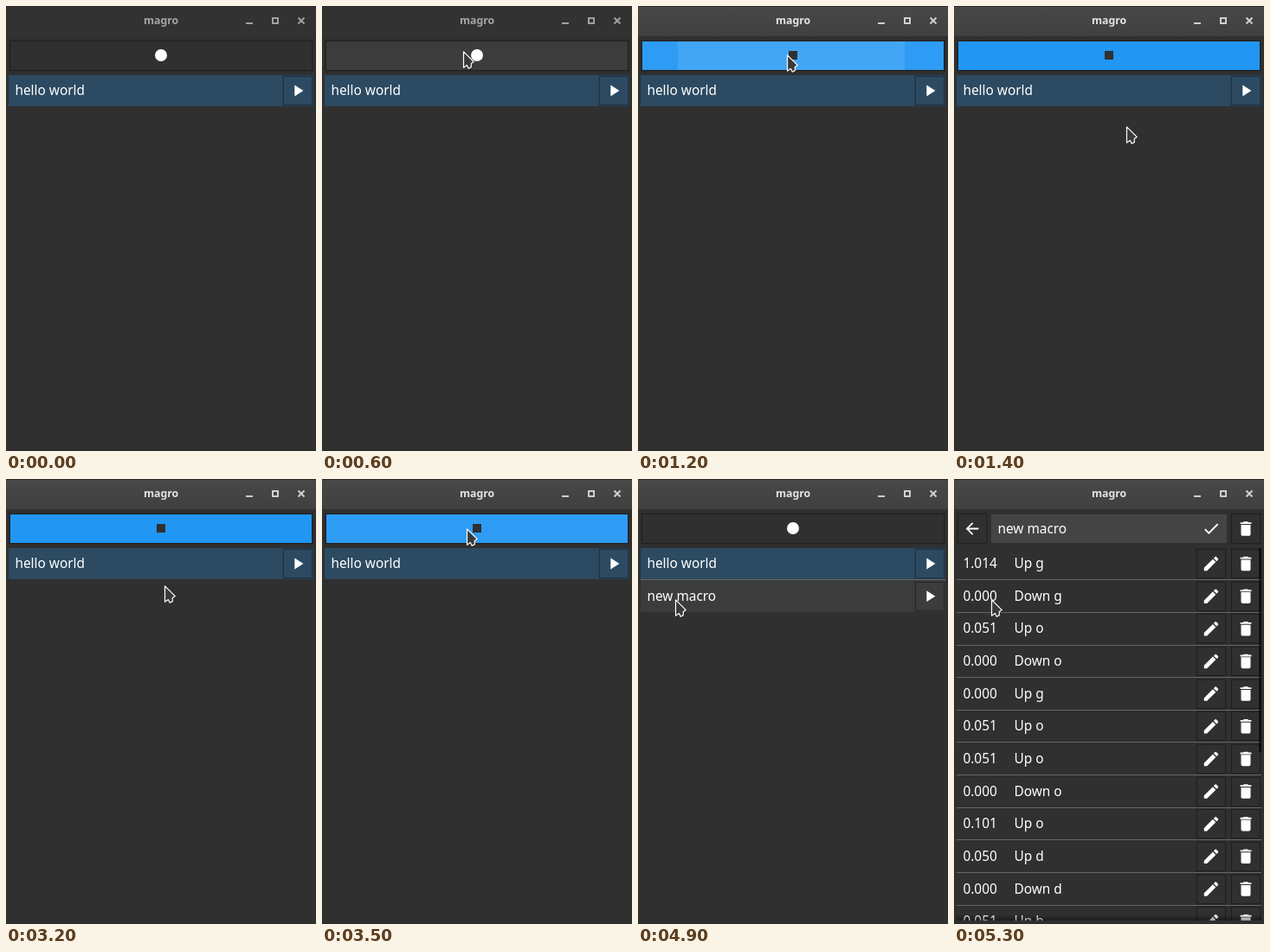
An HTML page with a canvas that plays this animation: 358x515 px, repeating every 7700 ms.

```html
<!DOCTYPE html>
<html lang="en">
<head>
<meta charset="utf-8">
<title>magro</title>
<style>
html, body { margin: 0; width: 100%; height: 100%; overflow: hidden; background: #303030; }
canvas { display: block; }
</style>
</head>
<body>
<canvas id="stage" width="358" height="515"></canvas>
<script>
const ctx = document.getElementById('stage').getContext('2d');
const LOOP = 7700, STEP = 100;
const BG = '#303030', WHITE = '#fff', HOVER = 'rgba(255,255,255,.059)';
const FONT = '"Noto Sans", "Open Sans", sans-serif';
const PITCH = 37.65;
const BAR = { x: 5, y: 41, w: 348, h: 33 };

const ICONS = {
  play: 'M8 5v14l11-7z',
  record: 'M4.4 12a7.6 7.6 0 1 0 15.2 0a7.6 7.6 0 1 0-15.2 0z',
  back: 'M20 11H7.83l5.59-5.59L12 4l-8 8 8 8 1.41-1.41L7.83 13H20v-2z',
  check: 'M9 16.17L4.83 12l-1.42 1.41L9 19 21 7l-1.41-1.41z',
  trash: 'M6 19c0 1.1.9 2 2 2h8c1.1 0 2-.9 2-2V7H6v12zM19 4h-3.5l-1-1h-5l-1 1H5v2h14V4z',
  edit: 'M3 17.25V21h3.75L17.81 9.94l-3.75-3.75L3 17.25zM20.71 7.04c.39-.39.39-1.02 0-1.41' +
    'l-2.34-2.34c-.39-.39-1.02-.39-1.41 0l-1.83 1.83 3.75 3.75 1.83-1.83z'
};
for (const k in ICONS) ICONS[k] = new Path2D(ICONS[k]);
const ARROW = new Path2D('M.5 .8L12.3 12.6L9.3 14.4V18.6L6.2 20.2L4.4 16.6L.5 19.2z');

const EVENTS = ['1.014 Up g', '0.000 Down g', '0.051 Up o', '0.000 Down o', '0.000 Up g', '0.051 Up o',
  '0.051 Up o', '0.000 Down o', '0.101 Up o', '0.050 Up d', '0.000 Down d', '0.051 Up b'];

// Pointer stops: time, x, y
const PATH = [
  [400, 93, 20], [500, 136, 38], [600, 163, 52], [700, 172, 56],
  [1200, 172, 56], [1300, 189, 106], [1400, 199, 139],
  [3100, 199, 139], [3200, 183, 123], [3300, 175, 93], [3400, 169, 66], [3500, 167, 57],
  [4500, 167, 57], [4600, 150, 70], [4700, 103, 105], [4800, 58, 132], [4900, 43, 139], [LOOP, 43, 139]
];

function pointerAt(t) {
  if (t < PATH[0][0]) return null;
  const i = PATH.findIndex(p => p[0] > t);
  const [t0, x0, y0] = PATH[i - 1], [t1, x1, y1] = PATH[i];
  const k = (t - t0) / (t1 - t0);
  return { x: Math.round(x0 + (x1 - x0) * k), y: Math.round(y0 + (y1 - y0) * k) };
}

const inside = (p, x, y, w, h) => p && p.x >= x && p.x < x + w && p.y >= y && p.y < y + h;

function rect(color, x, y, w, h) {
  ctx.fillStyle = color;
  ctx.fillRect(x, y, w, h);
}

function ring(alpha, x, y, w, h) {
  ctx.lineWidth = 1;
  ctx.strokeStyle = `rgba(0,0,0,${alpha})`;
  ctx.strokeRect(x - .5, y - .5, w + 1, h + 1);
}

function frame(x, y, w, h) {
  ring(.32, x, y, w, h);
  ring(.1, x - 1, y - 1, w + 2, h + 2);
}

function text(str, x, y, color = WHITE, font = '15.4px ') {
  ctx.font = font + FONT;
  ctx.fillStyle = color;
  ctx.fillText(str, x, y);
}

function icon(name, cx, cy) {
  ctx.save();
  ctx.translate(cx - 11, cy - 11);
  ctx.scale(22 / 24, 22 / 24);
  ctx.fillStyle = WHITE;
  ctx.fill(ICONS[name]);
  ctx.restore();
}

function iconButton(name, cx, cy, h = 32) {
  frame(cx - 16, Math.round(cy - h / 2), 32, h);
  icon(name, cx, cy);
}

function titleBar(active) {
  if (active) {
    const g = ctx.createLinearGradient(0, 1, 0, 35);
    g.addColorStop(0, '#484848');
    g.addColorStop(1, '#404040');
    rect(g, 0, 1, 358, 34);
  } else {
    rect('#323232', 0, 1, 358, 34);
  }
  rect('#2b2b2b', 0, 0, 358, 1);
  ctx.textAlign = 'center';
  text('magro', 179, 21, active ? '#e4e4e4' : '#a6a6a6', 'bold 12.3px ');
  ctx.textAlign = 'left';
  const c = active ? '#cfcfcf' : '#a0a0a0';
  rect(c, 277, 19, 8, 2);
  ctx.strokeStyle = c;
  ctx.lineWidth = 2;
  ctx.strokeRect(308, 14, 6, 6);
  ctx.beginPath();
  ctx.moveTo(337.5, 13.5); ctx.lineTo(344.5, 20.5);
  ctx.moveTo(344.5, 13.5); ctx.lineTo(337.5, 20.5);
  ctx.stroke();
}

function recordBar(t, p) {
  const { x, y, w, h } = BAR, busy = t >= 1100 && t < 4400;
  frame(x, y, w, h);
  if (busy) rect('#2196f3', x, y, w, h);
  if (inside(p, x, y, w, h)) rect(HOVER, x, y, w, h);
  const since = t - (t >= 4400 ? 4400 : 1100) + 50;
  if (since > 0 && since < 300) {
    const k = 1 - (1 - since / 300) ** 2;
    const half = Math.round(w / 2 * k);
    rect(`rgba(255,255,255,${.4 * (1 - k)})`, 177 - half < x ? x : 177 - half, y, Math.min(half * 2, w), h);
  }
  if (busy) rect(BG, 174, 52, 10, 10);
  else icon('record', 179, 57);
}

function separator(i) {
  rect('#666', 3, Math.round(116.2 + PITCH * i), 352, 1);
}

function listView(t, p) {
  recordBar(t, p);
  rect('#2c4a61', 3, 80, 352, 36);
  text('hello world', 10.4, 103);
  iconButton('play', 337, 98);
  if (t < 4400) return;
  if (inside(p, 3, 117, 352, 37)) rect('#3c3c3c', 3, 117, 352, 37);
  separator(0);
  text('new macro', 10.4, 140.5);
  iconButton('play', 337, 135.7);
}

function editView() {
  iconButton('back', 21, 57.5, 33);
  rect('#444', 43, 41, 272, 33);
  text('new macro', 50.4, 63);
  icon('check', 297, 57.5);
  iconButton('trash', 337, 57.5, 33);

  ctx.save();
  ctx.beginPath();
  ctx.rect(3, 78, 352, 433);
  ctx.clip();
  EVENTS.forEach((e, i) => {
    const cut = e.indexOf(' '), cy = 98 + PITCH * i;
    text(e.slice(0, cut), 10.4, Math.round(cy + 5));
    text(e.slice(cut + 1), 69.5, Math.round(cy + 5));
    iconButton('edit', 297, cy);
    iconButton('trash', 337, cy);
    separator(i);
  });
  rect('rgba(0,0,0,.6)', 352, 80, 3, 236);
  const g = ctx.createLinearGradient(0, 504, 0, 511);
  g.addColorStop(0, 'rgba(0,0,0,0)');
  g.addColorStop(1, 'rgba(0,0,0,.4)');
  rect(g, 3, 504, 352, 7);
  ctx.restore();
}

function pointer(p) {
  ctx.save();
  ctx.translate(p.x, p.y);
  ctx.fillStyle = '#3a3a3a';
  ctx.fill(ARROW);
  ctx.strokeStyle = WHITE;
  ctx.lineWidth = 1.2;
  ctx.lineJoin = 'round';
  ctx.stroke(ARROW);
  ctx.restore();
}

function draw(now) {
  const t = Math.floor(now % LOOP / STEP) * STEP;
  const p = pointerAt(t);
  rect(BG, 0, 0, 358, 515);
  rect('#2c2c2c', 0, 514, 358, 1);
  titleBar(t >= 900);
  if (t < 5300) listView(t, p);
  else editView();
  if (p) pointer(p);
}

let start;
function tick(now) {
  start ??= now;
  draw(Math.max(0, now - start));
  requestAnimationFrame(tick);
}
draw(0);
requestAnimationFrame(tick);
</script>
</body>
</html>
```
